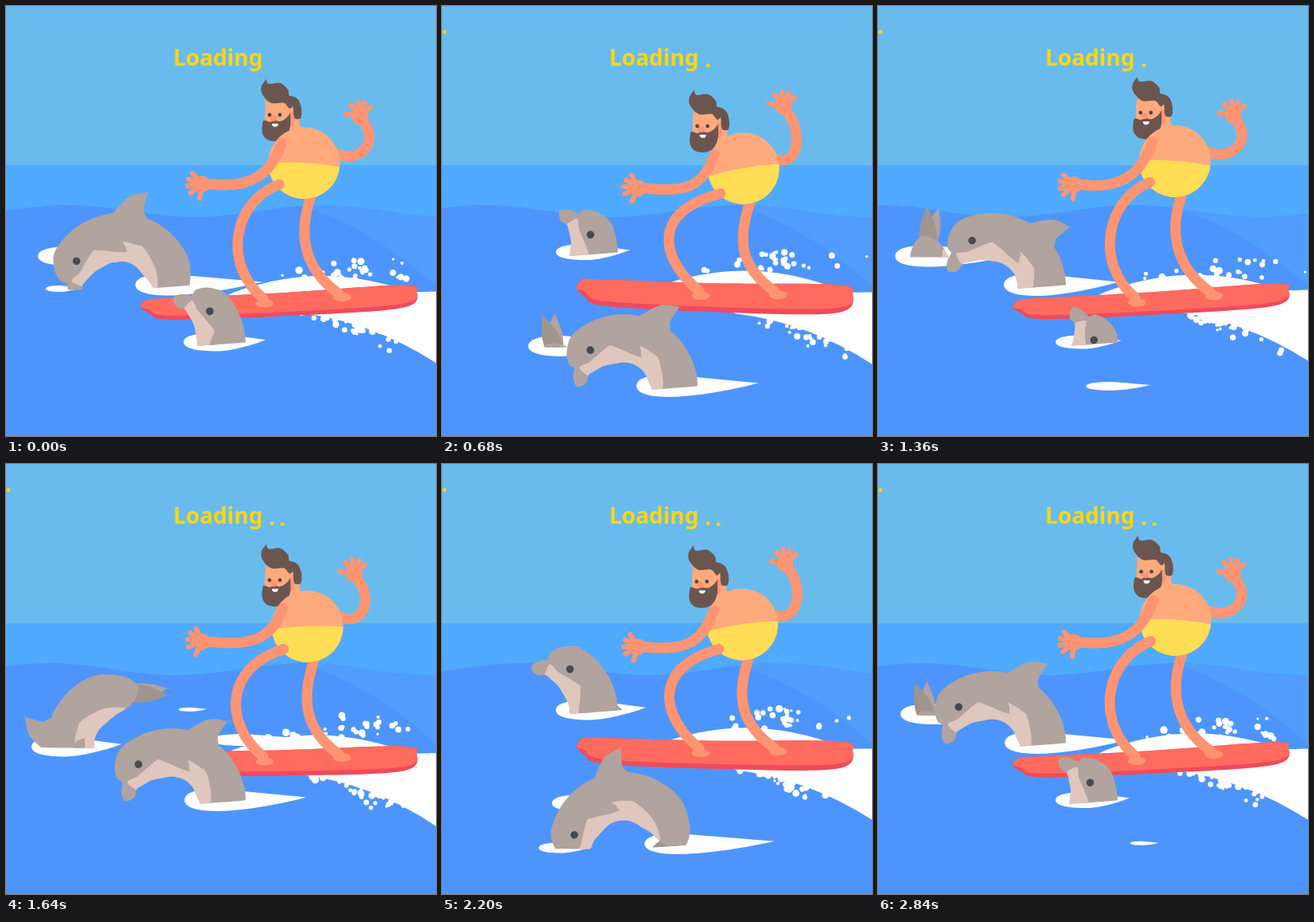
Recreate the animation shown at these times as an HTML page with a canvas. Size 540 px wide and 540 px high, loop 2880 ms.

```html
<!DOCTYPE html>
<html lang="en">
<head>
<meta charset="utf-8">
<title>Loading</title>
<style>
  html, body { margin: 0; width: 100%; height: 100%; overflow: hidden; background: #69bbee; }
  canvas { display: block; width: 100vmin; height: 100vmin; }
</style>
</head>
<body>
<canvas id="stage" width="540" height="540"></canvas>
<script>
const ctx = document.getElementById('stage').getContext('2d');
const LOOP = 2880, CYCLE = 1440, STEP = 40, TAU = Math.PI * 2;
const SKIN = '#ffaa7d', LIMB = '#ff9472', HAIR = '#6b564f', FOAM = '#fff';
const GREY = '#b1a39d', DARK_GREY = '#a1948e', BELLY = '#dfc7be', DARK = '#484a50';

const mod = (v, n) => ((v % n) + n) % n;
const lerp = (a, b, k) => a + (b - a) * k;
const rad = deg => deg * Math.PI / 180;
const random = n => mod(Math.sin(n * 12.9898) * 43758.5453, 1);

function fill(color) { ctx.fillStyle = color; ctx.fill(); }
function oval(x, y, rx, ry, color) {
  ctx.beginPath();
  ctx.ellipse(x, y, rx, ry, 0, 0, TAU);
  fill(color);
}
// Closed smooth curve through the points; a repeated point makes a corner.
function blob(points, color) {
  const n = points.length, at = i => points[mod(i, n)];
  ctx.beginPath();
  ctx.moveTo(...points[0]);
  for (let i = 0; i < n; i++) {
    const [a, b, c, d] = [at(i - 1), at(i), at(i + 1), at(i + 2)];
    ctx.bezierCurveTo(b[0] + (c[0] - a[0]) / 6, b[1] + (c[1] - a[1]) / 6,
      c[0] - (d[0] - b[0]) / 6, c[1] - (d[1] - b[1]) / 6, c[0], c[1]);
  }
  fill(color);
}
function limb(x0, y0, x1, y1, x2, y2, x3, y3, width = 13) {
  ctx.beginPath();
  ctx.moveTo(x0, y0);
  ctx.bezierCurveTo(x1, y1, x2, y2, x3, y3);
  ctx.strokeStyle = LIMB;
  ctx.lineWidth = width;
  ctx.lineCap = 'round';
  ctx.stroke();
}

function sea(time) {
  ctx.fillStyle = '#69bbee';
  ctx.fillRect(0, 0, 540, 540);
  ctx.fillStyle = '#50aaff';
  ctx.fillRect(0, 200, 540, 340);
  const u = mod(time, 240) / 240;
  const trough = 237 + 320 * u - 35 * Math.sin(TAU * u);
  const surface = x => 257.5 + 7.5 * Math.cos(TAU * (x - trough) / 320);
  const swell = from => {
    ctx.beginPath();
    for (let x = from; x <= 540; x += 6) ctx.lineTo(x, surface(x));
  };
  swell(0);
  ctx.lineTo(540, 540);
  ctx.lineTo(0, 540);
  fill('#4d95fc');
  swell(372);
  ctx.lineTo(540, 352);
  ctx.quadraticCurveTo(462, 280, 372, surface(372));
  fill('#509dfe');
}

// A foam patch opens, stretches to the right and is dragged away.
function puddle(age, dx, y) {
  const life = 740;
  if (age >= life) return;
  const left = 158 + 40 * Math.max(0, 1 - age / 120) ** 2 + 232 * Math.max(0, (age - 330) / 410) ** 3;
  const right = Math.max(left, 210 + .255 * age);
  const h = 14 * Math.sin(Math.PI * age / life) ** .7;
  const mid = left + Math.min((right - left) * .42, 42);
  ctx.save();
  ctx.translate(dx, y - Math.max(0, age - 520) / 35);
  ctx.beginPath();
  ctx.moveTo(left, 0);
  ctx.bezierCurveTo(left, -h * .7, lerp(left, mid, .4), -h, mid, -h);
  ctx.lineTo(right, -h * .25);
  ctx.bezierCurveTo(lerp(right, mid, .4), h * .6, lerp(mid, right, .2), h, mid, h);
  ctx.bezierCurveTo(lerp(left, mid, .4), h, left, h * .7, left, 0);
  fill(FOAM);
  ctx.restore();
}

// The dolphin is bent around the jump centre: [degrees ahead of the eye, radius].
const polar = points => points.map(([deg, r]) => [r * Math.cos(rad(deg)), -r * Math.sin(rad(deg))]);
function bow(r, from, to) {
  const steps = 6;
  return Array.from({ length: steps + 1 }, (_, i) => [lerp(from, to, i / steps), r]);
}
const JAW = [[0, 37], [15, 41], [28, 47]];
const BODY = polar([[47, 55], [45, 61], [36, 65], [27, 67], [25, 75], [16, 85], ...bow(93, 2, -128),
  [-150, 87], [-165, 79], [-168, 66], [-163, 50], [-140, 38], ...bow(32.5, -115, -25), ...JAW, [40, 47]]);
const UNDER = polar([[30, 47], [24, 61], [12, 54], [-5, 53], ...bow(57, -25, -92), [-125, 50],
  [-157, 47], [-140, 38], ...bow(32.5, -115, -25), ...JAW]);
const DORSAL = polar([[-50, 88], [-53, 92], [-65, 114], [-75.5, 124], [-75.5, 124], [-76, 102], [-80, 88]]);
const FLIPPER = polar([[-22, 60], [-40, 48], [-55, 44], [-71, 45], [-71, 45], [-58, 58]]);
const FLUKE = [[-8, -9], [18, -10], [44, 0], [44, 0], [18, 10], [-8, 9]];
const [TAIL] = polar([[-163, 67]]);

function flukes(p) {
  const bend = 44 * Math.sin(Math.PI * (Math.min(p, 400) - 170) / 240);
  const spread = (Math.min(p, 310) - 240) / 7;
  for (const [side, color] of [[-1, GREY], [1, DARK_GREY]]) {
    ctx.save();
    ctx.translate(...TAIL);
    ctx.rotate(rad(253 - bend - side * spread));
    blob(FLUKE, color);
    ctx.restore();
  }
}

// Each jump rises at (205, 350) and dives at (80, 355), shifted by dx, dy.
function dolphin(time, dx, dy) {
  const p = mod(time, CYCLE), diving = p < 470;
  ctx.save();
  ctx.translate(dx, dy);
  puddle(mod(p - 1000, CYCLE), 0, 350);
  puddle(mod(p + 40, CYCLE), -126, 355);
  if (p > 1000 || diving) {
    ctx.beginPath();
    ctx.moveTo(-90, 0);
    ctx.lineTo(-90, 350);
    ctx.quadraticCurveTo(110, 363, 240, 350);
    ctx.lineTo(450, 350);
    ctx.lineTo(450, 0);
    ctx.clip();
    ctx.translate(143, 353);
    ctx.rotate(-rad(5 + .45 * (p + (diving ? CYCLE : 0) - 1120)));
    if (diving) flukes(p);
    blob(DORSAL, GREY);
    blob(BODY, GREY);
    blob(UNDER, BELLY);
    blob(FLIPPER, GREY);
    oval(63.5, 0, 4.8, 4.8, DARK);
  }
  ctx.restore();
}

function foam(time, tilt, lift) {
  ctx.beginPath();
  for (let u = 0; u <= 1; u += .05) {
    const base = lerp(lerp(367, 352, tilt), 366, u);
    ctx.lineTo(272 + 248 * u, base + lift - 27 * Math.sin(Math.PI * u) ** .8);
  }
  ctx.lineTo(540, 359 + lift);
  ctx.lineTo(540, 449 + 1.4 * lift);
  ctx.quadraticCurveTo(460, 397 + lift, 370, 386 + lift);
  fill(FOAM);

  const period = 480;
  for (let i = 0; i < 60; i++) {
    const clock = time / period + random(i + 1), u = mod(clock, 1);
    const seed = i * 7 + mod(Math.floor(clock), LOOP / period) * 613;
    const a = random(seed + 3), b = random(seed + 5);
    const r = (1.8 + 3.4 * random(seed + 9)) * (1 - .25 * u);
    if (i % 2) {
      oval(310 + 125 * a + 110 * u, 347 - 15 * tilt + lift - (8 + 26 * b) * Math.sin(Math.PI * u * .8) + 6 * u, r, r, FOAM);
    } else {
      const x = 365 + 75 * a + 90 * u;
      oval(x, 387 + lift + Math.max(0, x - 385) * .23 + 26 * b * u, r, r, FOAM);
    }
  }
}

const BOARD = [[-173, 0], [-166, -8], [-150, -9], [0, -8], [153, -10], [174, -1], [152, 19],
  [0, 21], [-137, 18], [-163, 9]];
function board(tilt, lift) {
  ctx.save();
  ctx.translate(342, lerp(369, 357, tilt) + lift);
  ctx.rotate(rad(lerp(-3, 1.8, tilt)));
  ctx.scale(1, lerp(1, 1.25, tilt));
  blob(BOARD, '#ef4a5d');
  blob(BOARD.map(([x, y]) => [x, y > 5 ? y - 5 : y]), '#ff6b5e');
  ctx.restore();
}

function hand(x, y, direction) {
  oval(x, y, 10.5, 10.5, LIMB);
  for (const spread of [-75, -32, -2, 26, 55]) {
    const c = Math.cos(rad(direction + spread)), s = Math.sin(rad(direction + spread));
    limb(x, y, x + 6 * c, y + 6 * s, x + 12 * c, y + 12 * s, x + 18 * c, y + 18 * s, 6.2);
  }
}

function head(x, y) {
  ctx.save();
  ctx.translate(x, y);
  blob([[20, -8], [37, -2], [38, 12], [46, 26], [24, 28]], SKIN);
  blob([[24, -24], [35, -21], [40, -9], [39, 3], [31, 3], [26, -8]], HAIR);
  blob([[-5, -18], [-5, -18], [27, -18], [27, 16], [14, 24], [-5, 18], [-6, 4]], SKIN);
  blob([[-4, -46], [-4, -46], [-1, -40], [13, -41], [23, -33], [25, -25], [34, -21], [26, -9],
    [18, -16], [2, -16], [-9, -27], [-10, -37]], HAIR);
  oval(28, 5, 3, 9, LIMB);
  blob([[-7, 6], [0, 8], [6, 6], [14, 7], [22, 2], [26, -4], [26, -4], [26, 14], [20, 27], [9, 32],
    [-3, 30], [-9, 22], [-9, 11]], HAIR);
  oval(5, 3, 4.5, 4, LIMB);
  for (const eye of [0, 13]) oval(eye, -1, 2.4, 2.4, DARK);
  ctx.beginPath();
  ctx.arc(7, 10, 4, 0, Math.PI);
  fill(FOAM);
  ctx.restore();
}

function trunks(x, y, turn) {
  ctx.save();
  oval(x, y, 45, 45, SKIN);
  ctx.clip();
  ctx.translate(x, y);
  ctx.rotate(rad(turn));
  ctx.beginPath();
  ctx.moveTo(-50, 3);
  ctx.quadraticCurveTo(0, -4, 50, 3);
  ctx.lineTo(50, 60);
  ctx.lineTo(-50, 60);
  fill('#ffdd55');
  ctx.restore();
}

// Every joint swings on a cosine of the same period, each with its own peak time.
function surfer(sway, tilt, lift) {
  const bodyX = sway(376, 5, 440), bodyY = sway(200, 8, 440);
  const shoulderX = sway(344, 4, 220), shoulderY = sway(179, 10, 520);
  const leftX = 246, leftY = sway(226.5, 3.5, 860);
  const rightX = sway(437, -9.5, 560), rightY = sway(132, -7, 800);
  const hipX = sway(346, 6.5, 460), hipY = sway(229, 10, 480);
  const footL = lerp(374, 363, tilt) + lift, footR = lerp(366, 362, tilt) + lift;

  oval(325, footL, 11.5, 5, LIMB);
  oval(422, footR, 11.5, 5.5, LIMB);
  limb(bodyX + 10, bodyY + 38, bodyX - 10, bodyY + 92, 376, footR - 34, 418, footR - 4);
  limb(bodyX + 38, bodyY - 13, bodyX + 68, bodyY + 2, rightX + 26, rightY + 34, rightX + 4, rightY + 6);
  hand(rightX, rightY, -95);
  head(sway(325.5, 6, 100), sway(144, 11, 500));
  trunks(bodyX, bodyY, sway(-3, -7.5, 580));
  limb(leftX + 10, leftY, leftX + 60, leftY + 6, shoulderX - 14, shoulderY + 40, shoulderX, shoulderY);
  hand(leftX, leftY, sway(180, 20, 430));
  limb(hipX, hipY, lerp(285, 264, tilt), hipY + 22, 271, footL - 50, 323, footL - 6);
}

function caption(time) {
  ctx.fillStyle = '#ffd60a';
  ctx.font = '700 28px "Noto Sans", "Open Sans", sans-serif';
  ctx.fillText('Loading', 210, 75);
  if (time >= 480) {
    ctx.fillText('.', 330, 77);
    ctx.fillText('.', -1, 35);
  }
  if (time >= 1440) ctx.fillText('.', 343, 78);
}

function draw(now) {
  const time = Math.floor(mod(now, LOOP) / STEP) * STEP;
  const sway = (mean, reach, peak) => mean + reach * Math.cos(TAU * (time - peak) / CYCLE);
  const tilt = sway(.45, .55, 580), lift = sway(-.5, 6, 360);
  sea(time);
  dolphin(time + 480, -15, -41);
  dolphin(time, 0, 0);
  foam(time, tilt, lift);
  board(tilt, lift);
  surfer(sway, tilt, lift);
  dolphin(time + 1200, 65, 72);
  dolphin(time + 720, 85, 127);
  caption(time);
}

let start;
function tick(now) {
  start ??= now;
  draw(now - start);
  requestAnimationFrame(tick);
}
draw(0);
requestAnimationFrame(tick);
</script>
</body>
</html>
```
